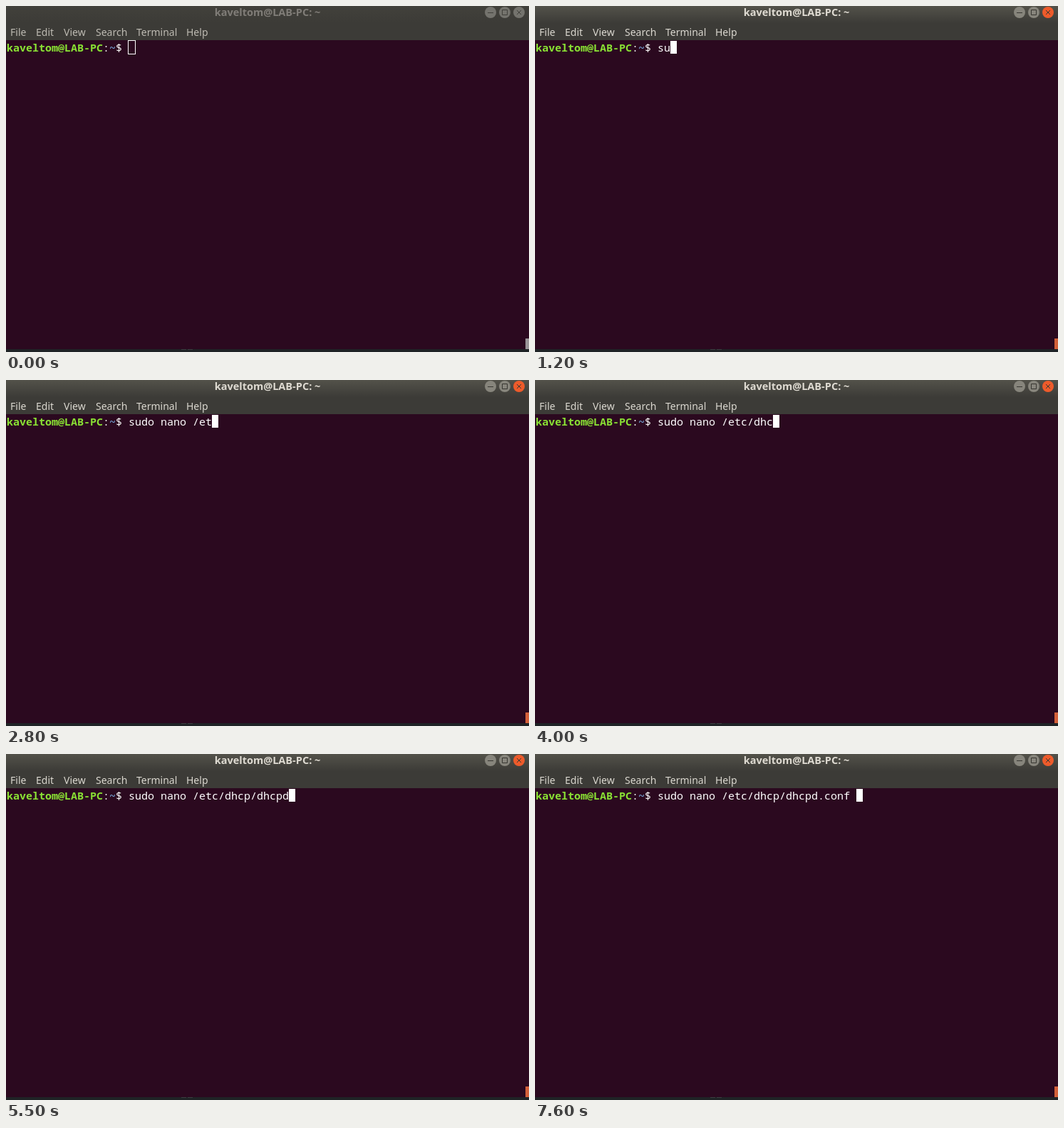
An HTML page with a canvas for the animation above (8 s loop, 734 px wide and 486 px high).

```html
<!DOCTYPE html>
<html lang="en">
<head>
<meta charset="utf-8">
<title>Terminal</title>
<style>
  html, body { margin: 0; width: 100%; height: 100%; overflow: hidden; background: #2b091f; }
  canvas { display: block; }
</style>
</head>
<body>
<canvas id="stage" width="734" height="486"></canvas>
<script>
const ctx = document.getElementById('stage').getContext('2d');
const LOOP = 8000, CELL = 9, BASELINE = 64;
const USER = 'kaveltom@LAB-PC';
const COMMAND = 'sudo nano /etc/dhcp/dhcpd.conf ';
const MONO = '15px "Noto Sans Mono", "DejaVu Sans Mono", monospace';
const SANS = '"Noto Sans", "Open Sans", sans-serif';
const MENUS = [['File', 6], ['Edit', 42], ['View', 81], ['Search', 126], ['Terminal', 183], ['Help', 253]];

// [time, number of typed characters]; one slip is deleted and retyped
const KEYS = [
  [1100, 1], [1200, 2], [1300, 3], [1400, 4], [1500, 5], [1600, 6],
  [1800, 7], [1900, 8], [2000, 9], [2200, 10], [2400, 11], [2600, 12],
  [2800, 13], [3000, 14], [3500, 15], [3700, 16], [3900, 17], [4000, 18],
  [4300, 19], [4500, 20], [4800, 21], [5000, 22], [5100, 23], [5400, 24],
  [5500, 25], [6000, 24], [6100, 25], [6400, 26], [6500, 27], [6700, 28],
  [6800, 29], [7000, 31]
];
const FOCUS = [[300, 0.35], [400, 0.7], [500, 0.95], [900, 1]];

const stepAt = (steps, t) => steps.reduce((value, [at, next]) => t >= at ? next : value, 0);

function mix(from, to, k) {
  const channel = (hex, i) => parseInt(hex.slice(1 + 2 * i, 3 + 2 * i), 16);
  const rgb = [0, 1, 2].map(i => Math.round(channel(from, i) * (1 - k) + channel(to, i) * k));
  return `rgb(${rgb})`;
}

function rect(x, y, w, h, color) {
  ctx.fillStyle = color;
  ctx.fillRect(x, y, w, h);
}

function text(string, x, y, font, color, align = 'left') {
  ctx.font = font;
  ctx.fillStyle = color;
  ctx.textAlign = align;
  ctx.fillText(string, x, y);
}

function button(x, icon, face, ink) {
  ctx.beginPath();
  ctx.arc(x, 9, 8, 0, Math.PI * 2);
  ctx.fillStyle = face;
  ctx.fill();
  ctx.strokeStyle = ink;
  ctx.lineWidth = 1;
  ctx.beginPath();
  if (icon === 'minimize') {
    ctx.moveTo(x - 4, 9.5);
    ctx.lineTo(x + 4, 9.5);
  } else if (icon === 'maximize') {
    ctx.rect(x - 3.5, 5.5, 7, 7);
  } else {
    ctx.moveTo(x - 3, 6);
    ctx.lineTo(x + 3, 12);
    ctx.moveTo(x + 3, 6);
    ctx.lineTo(x - 3, 12);
  }
  ctx.stroke();
}

function drawWindow(focus) {
  const bar = ctx.createLinearGradient(0, 0, 0, 24);
  bar.addColorStop(0, mix('#42413b', '#53524a', focus));
  bar.addColorStop(1, '#3c3b37');
  rect(0, 0, 734, 24, bar);
  rect(0, 24, 734, 24, '#3c3b37');
  rect(0, 48, 734, 434, '#2b091f');
  rect(0, 482, 734, 4, '#1f2326');
  rect(246, 482, 7, 1, '#3b3e40');
  rect(255, 482, 7, 1, '#3b3e40');

  text(USER + ': ~', 367, 14, 'bold 14.5px ' + SANS, mix('#807d78', '#dfdbd2', focus), 'center');
  const menuColor = mix('#bdbab2', '#dad7cf', focus);
  for (const [label, x] of MENUS) text(label, x, 42, '14px ' + SANS, menuColor);

  const face = mix('#74736d', '#87857c', focus);
  const ink = mix('#41403b', '#383732', focus);
  button(680, 'minimize', face, ink);
  button(700, 'maximize', face, ink);
  button(720, 'close', mix('#74736d', '#ee5b2b', focus), ink);
  rect(729, 467, 5, 15, mix('#999598', '#d2603a', focus));
}

function drawPrompt(t, focus) {
  const cellX = column => 1 + column * CELL;
  const end = USER.length;
  text(USER, cellX(0), BASELINE, 'bold ' + MONO, '#8ae234');
  text(':', cellX(end), BASELINE, MONO, '#ffffff');
  text('~', cellX(end + 1), BASELINE, 'bold ' + MONO, '#729fcf');
  text('$', cellX(end + 2), BASELINE, MONO, '#ffffff');

  const start = end + 4;
  const typed = stepAt(KEYS, t);
  text(COMMAND.slice(0, typed), cellX(start), BASELINE, MONO, '#ffffff');

  const cursorX = cellX(start + typed);
  if (focus === 0) {
    ctx.strokeStyle = '#ffffff';
    ctx.lineWidth = 1;
    ctx.strokeRect(cursorX - 0.5, 48.5, 10, 19);
  } else if (t < 7400 || t >= 7600) {
    rect(cursorX, 49, CELL, 18, '#ffffff');
  }
}

function draw(now) {
  const t = now % LOOP;
  const focus = stepAt(FOCUS, t);
  drawWindow(focus);
  drawPrompt(t, focus);
  requestAnimationFrame(draw);
}

draw(performance.now());
</script>
</body>
</html>
```
